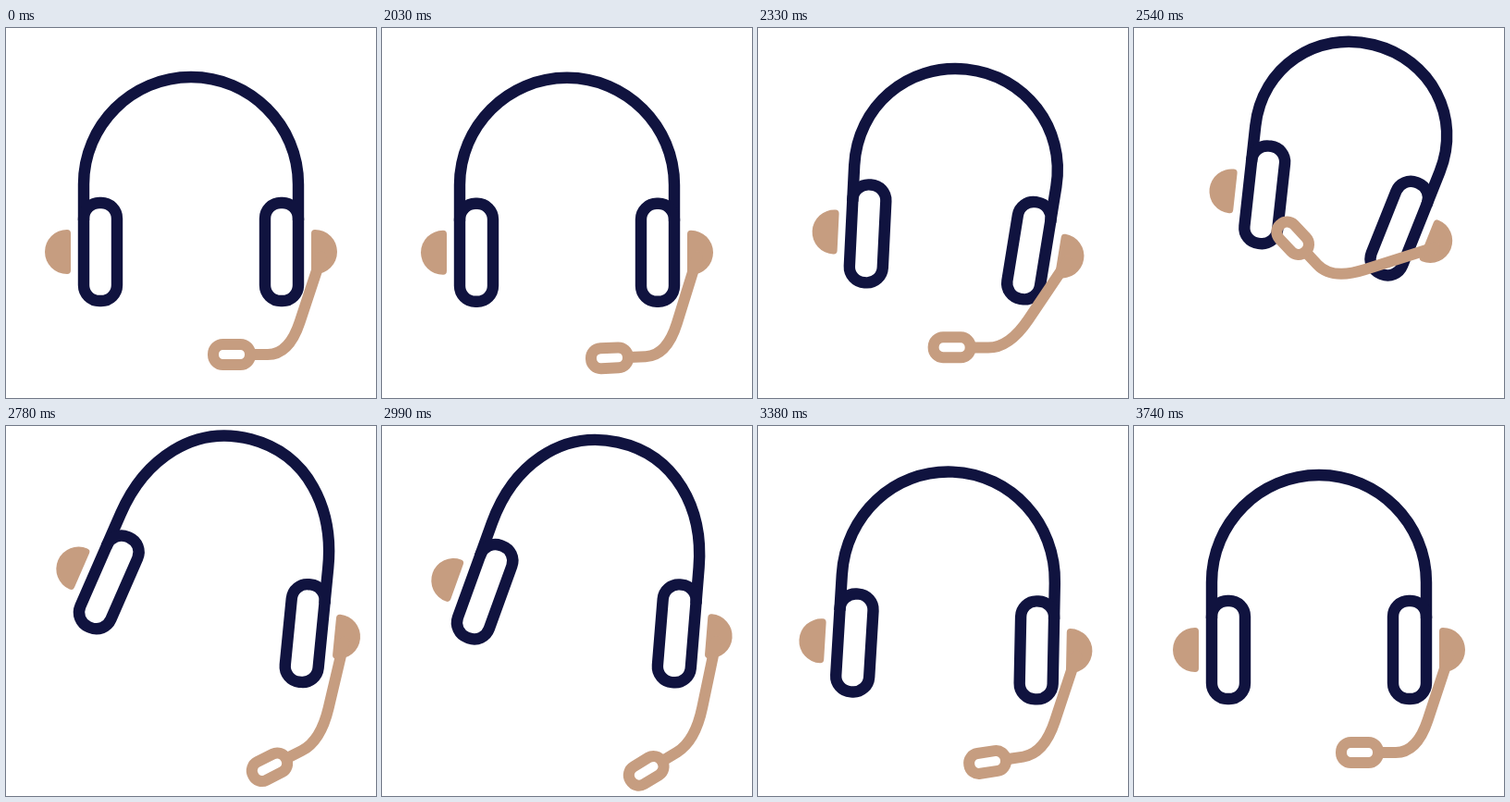
An HTML page for the animation above (3.77 s loop, 400 px wide and 400 px high).

```html
<!DOCTYPE html>
<html lang="en">
<head>
<meta charset="utf-8">
<title>Headset</title>
<style>
  html, body { margin: 0; width: 100%; height: 100%; overflow: hidden; background: #fff; }
  svg { display: block; width: 100%; height: 100%; }
  .line { fill: none; stroke: #10133f; stroke-width: 12.4; }
  .tan { fill: none; stroke: #c69d80; stroke-width: 12; stroke-linecap: round; }
  .pad { fill: #c69d80; }
</style>
</head>
<body>
<svg viewBox="0 0 400 400">
  <defs>
    <g id="ear">
      <rect class="line" x="-18" y="-53" width="36" height="106" rx="17"/>
      <path class="pad" d="M-32-20q0-4-4-4a24 24 0 0 0 0 48q4 0 4-4z"/>
    </g>
  </defs>
  <path id="band" class="line"/>
  <use id="left" href="#ear"/>
  <use id="right" href="#ear"/>
  <path id="arm" class="tan"/>
  <rect id="mic" class="tan" x="-20" y="-11" width="40" height="22" rx="10.5"/>
</svg>
<script>
const LOOP = 3770, START = 2030, STEP = 30;

// time, tilt, spread, ear distance, shift x, shift y, arm angle, mic angle
const keys = [
  [2000, 0, 0, 196, 0, 0, 0, 0],
  [2030, 0, 0, 196, 0, 0.8, -1, -2.3],
  [2165, 1, -0.3, 195, 0.6, 4, -6, -20],
  [2330, 6, -3.2, 175.3, 5.75, -10.5, 15.6, 0.5],
  [2540, 14, -7.75, 150, 14, -43.5, 54, 47],
  [2780, 14.6, 9, 219, 17.25, -45.5, -4.7, -27],
  [2840, 14.6, 9.4, 221, 17.5, -46.5, -8, -34],
  [3080, 10, 6, 206, 12.5, -33, -4, -28],
  [3170, 7.5, 4.4, 202.4, 9.75, -18, 0, -18],
  [3400, 2, 1, 197, 2.5, -3, 0, -8],
  [3620, 0, 0, 196, 0, 0, -0.8, -2],
  [3740, 0, 0, 196, 0, 0, 0, 0]
];

const el = id => document.getElementById(id);
const add = (a, b, k = 1) => [a[0] + b[0] * k, a[1] + b[1] * k];
const turn = ([x, y], deg) => {
  const r = deg * Math.PI / 180, c = Math.cos(r), s = Math.sin(r);
  return [x * c - y * s, x * s + y * c];
};
const toward = (a, b, dist) => add(a, add(b, a, -1), dist / Math.hypot(b[0] - a[0], b[1] - a[1]));
const path = parts => parts.map(p => Array.isArray(p) ? p.map(n => n.toFixed(2)).join(" ") : p).join(" ");

const slope = (i, c) =>
  keys[i] && keys[i + 1] ? (keys[i + 1][c] - keys[i][c]) / (keys[i + 1][0] - keys[i][0]) : 0;

// Monotone tangent: flat at extremes, so nothing overshoots a key
const tangent = (i, c) => {
  const a = slope(i - 1, c), b = slope(i, c);
  return a * b > 0 ? 2 * a * b / (a + b) : 0;
};

function pose(t) {
  if (t <= keys[0][0]) return keys[0].slice(1);
  let i = 0;
  while (i < keys.length - 2 && t >= keys[i + 1][0]) i++;
  const p = keys[i], q = keys[i + 1], span = q[0] - p[0];
  const u = Math.min(1, (t - p[0]) / span), v = 1 - u;
  return p.map((_, c) =>
    v * v * (1 + 2 * u) * p[c] + u * u * (3 - 2 * u) * q[c] +
    span * u * v * (v * tangent(i, c) - u * tangent(i + 1, c))).slice(1);
}

function draw(t) {
  const [tilt, spread, gap, dx, dy, armTurn, micTurn] = pose(t);
  const mid = [200 + dx, 242 + dy];
  const half = turn([gap / 2, 0], tilt);
  const L = add(mid, half, -1), R = add(mid, half);
  const la = tilt + spread, ra = tilt - spread;
  const onLeft = (x, y) => add(L, turn([x, y], la));
  const onRight = (x, y) => add(R, turn([x, y], ra));

  el("left").setAttribute("transform", `translate(${L}) rotate(${la})`);
  el("right").setAttribute("transform", `translate(${R}) rotate(${ra}) scale(-1 1)`);

  const a = onLeft(-18, -73), b = onRight(18, -73);
  const across = toward([0, 0], add(b, a, -1), 1);
  const top = add(add(a, add(b, a, -1), 0.5), [across[1], -across[0]], 116 - 0.3 * Math.max(0, spread));
  el("band").setAttribute("d", path([
    "M", onLeft(-18, -34), "L", a,
    "C", onLeft(-18, -137), add(top, across, -64), top,
    "C", add(top, across, 64), onRight(18, -137), b,
    "L", onRight(18, -34)
  ]));

  const root = onRight(43, 5);
  const elbow = add(onRight(36, 0), turn([-28, 111], armTurn));
  const mic = add(elbow, turn([-62, 0], micTurn));
  el("arm").setAttribute("d", path([
    "M", root, "L", toward(elbow, root, 37),
    "Q", elbow, toward(elbow, mic, 23), "L", toward(mic, elbow, 21)
  ]));
  el("mic").setAttribute("transform", `translate(${mic}) rotate(${micTurn})`);
}

function frame() {
  const t = performance.now() % LOOP;
  draw(t < START ? 0 : t - (t - START) % STEP);
  requestAnimationFrame(frame);
}
frame();
</script>
</body>
</html>
```
